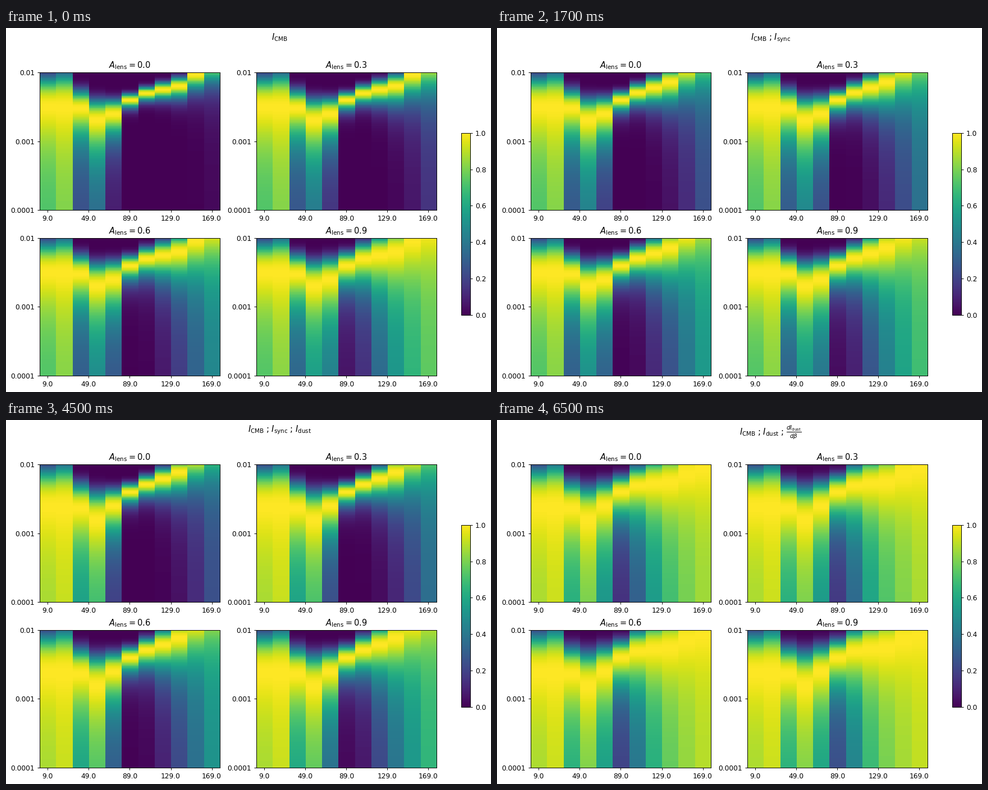
Recreate the animation shown at these times as a matplotlib script. Size 864x648 px, loop 8 s.

```python
import numpy as np
import matplotlib.pyplot as plt
from matplotlib.animation import FuncAnimation
from matplotlib.cm import ScalarMappable
from matplotlib.colors import Normalize

WIDTH, HEIGHT = 864, 648
SCALE = 13 * 87.75 / 936  # type and line sizes relative to matplotlib defaults

plt.rcParams.update({
    "font.family": "DejaVu Sans",
    "font.size": 10 * SCALE,
    "axes.linewidth": 0.8 * SCALE,
    "axes.titlepad": 6 * SCALE,
})
for axis in ("xtick", "ytick"):
    plt.rcParams.update({
        f"{axis}.major.size": 3.5 * SCALE,
        f"{axis}.major.width": 0.8 * SCALE,
        f"{axis}.major.pad": 3.5 * SCALE,
    })

CMB = r"$I_{\mathrm{CMB}}$"
SYNC = r"$I_{\mathrm{sync}}$"
DUST = r"$I_{\mathrm{dust}}$"
DUST_SLOPE = r"$\frac{dI_{\mathrm{dust}}}{d\beta}$"
SCENES = [
    (CMB,),
    (CMB, SYNC),
    (CMB, DUST),
    (CMB, SYNC, DUST),
    (CMB, DUST, DUST_SLOPE),
]

# Effect of each component: peak tilt and width lift at high multipoles,
# damping of the lensing gain, broadening at low multipoles.
EFFECTS = {
    CMB: (0, 0, 1.3, 0),
    SYNC: (0.016, 0.5, 0.52, 0),
    DUST: (0.008, 0, 0.9, 0.4),
    DUST_SLOPE: (-0.022, 1.6, 0.2, 0),
}

LENSING = (0.0, 0.3, 0.6, 0.9)
COLUMN = np.arange(11)
R = 1e3 * 10 ** np.linspace(-2, -4, 401)[1::2, None]


def log_curve(columns, values):
    return np.interp(COLUMN, columns, np.log(values))


# Peak position in units of 1e-3 and width relative to it, both as logs.
BASE_PEAK = log_curve([0, 2, 3, 4, 5, 6, 8, 10],
                      [3.1, 2.95, 2, 2.45, 3.9, 4.9, 6.2, 13.5])
BASE_WIDTH = log_curve([0, 1, 2, 3, 4, 5, 6, 10],
                       [1.21, 1.5, 0.58, 0.67, 0.43, 0.17, 0.165, 0.36])
HIGH = 1 / (1 + np.exp(4.3 - COLUMN))
LOW = COLUMN < 4


def likelihood(parts, amplitude):
    tilts, lifts, gains, broads = zip(*(EFFECTS[part] for part in parts))
    broad = sum(broads) * LOW
    lensing = np.prod(gains) * (amplitude / LENSING[-1]) ** 1.2
    peak = np.exp(BASE_PEAK - 0.67 * broad)
    peak *= 1 + sum(tilts) * np.maximum(COLUMN - 5, 0) ** 2
    width = peak * np.exp(BASE_WIDTH + broad + (sum(lifts) + lensing) * HIGH)
    return np.exp(-((R - peak) / width) ** 2 / 2)


fig = plt.figure(figsize=(WIDTH / 72, HEIGHT / 72), dpi=72, facecolor="white")


def pixel_axes(left, top, width, height):
    return fig.add_axes((left / WIDTH, 1 - (top + height) / HEIGHT,
                         width / WIDTH, height / HEIGHT))


def make_panel(index, amplitude):
    row, col = divmod(index, 2)
    ax = pixel_axes(59.7 + 385.8 * col, 78.8 + 294.8 * row, 321.5, 245.7)
    image = ax.imshow(likelihood(SCENES[0], amplitude), extent=(0, 11, -4, -2),
                      aspect="auto", interpolation="nearest",
                      cmap="viridis", vmin=0, vmax=1)
    ax.set_xticks(np.arange(5) * 2.5 + 0.5,
                  [f"{9 + 40 * k:.1f}" for k in range(5)])
    ax.set_yticks([-2, -3, -4], ["0.01", "0.001", "0.0001"])
    ax.set_title(rf"$A_{{\mathrm{{lens}}}} = {amplitude}$")
    return image


images = [make_panel(i, amplitude) for i, amplitude in enumerate(LENSING)]
fig.colorbar(ScalarMappable(Normalize(0, 1), "viridis"),
             cax=pixel_axes(811.2, 186.7, 16.2, 324.3))
heading = fig.text(487.7 / WIDTH, 1 - 7.6 / HEIGHT, "",
                   ha="center", va="top", fontsize="large")


def update(frame):
    parts = SCENES[(frame + 3) // 4]
    heading.set_text(" ; ".join(parts))
    for image, amplitude in zip(images, LENSING):
        image.set_data(likelihood(parts, amplitude))
    return [heading, *images]


animation = FuncAnimation(fig, update, frames=16, interval=500,
                          repeat=True, repeat_delay=0, blit=False)
plt.show()
```
